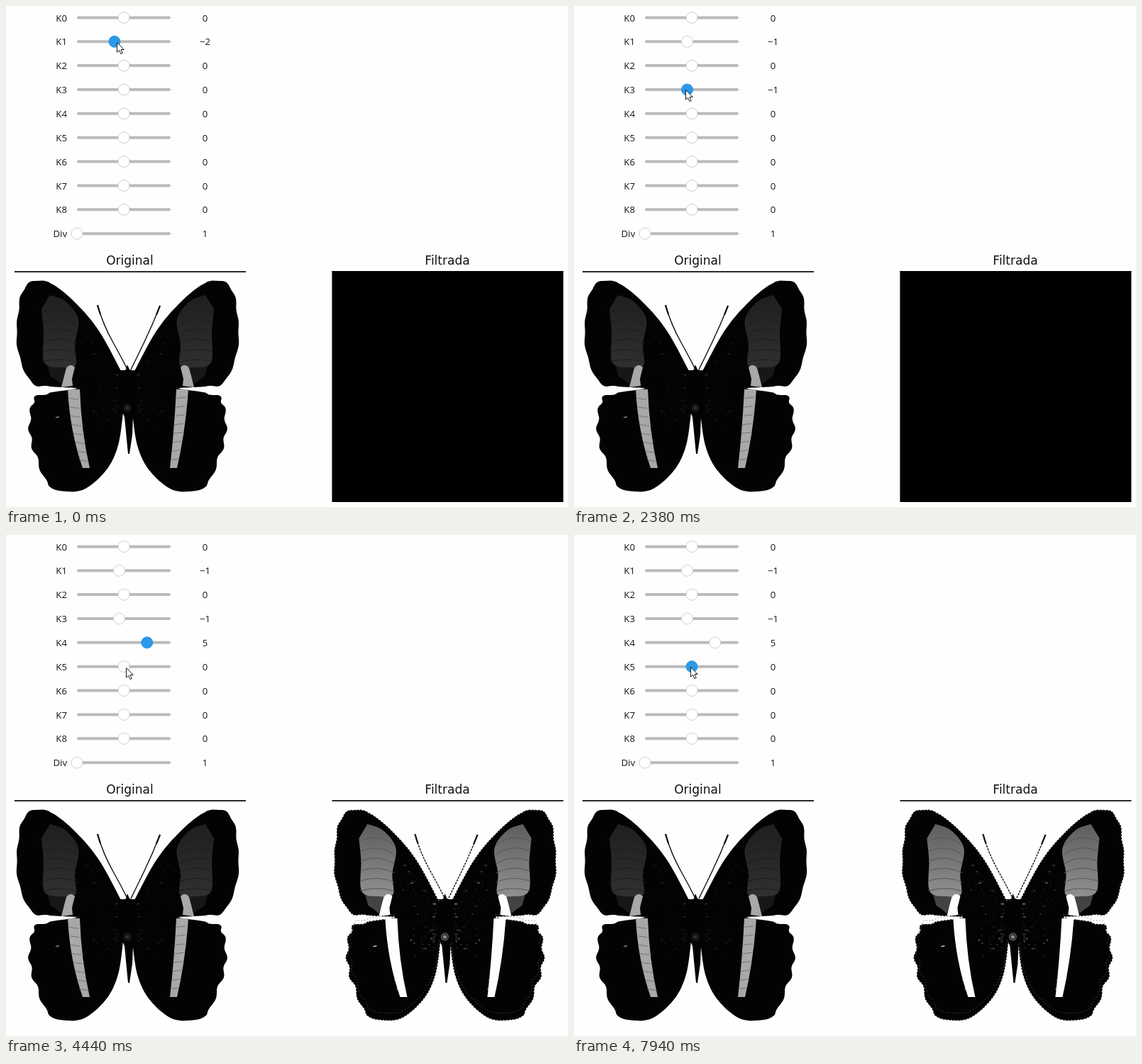
An HTML page that plays this animation: 792x707 px, repeating every 8000 ms.

```html
<!DOCTYPE html>
<html lang="es">
<head>
<meta charset="utf-8">
<title>Filtro de convolución</title>
<style>
  html, body { margin: 0; width: 100%; height: 100%; overflow: hidden; background: #fefefe; }
  svg { display: block; }
  .ui { font: 13.2px "Open Sans", "Noto Sans", sans-serif; fill: #161616; }
  .title { font: 17px "DejaVu Sans", sans-serif; fill: #111; text-anchor: middle; }
  .black { fill: #030303; }
  .patch { fill: var(--patch); }
  .bar { fill: var(--bar); }
  .speck { fill: var(--speck); }
  .vein { stroke: var(--vein); fill: none; }
  .barVein { stroke: var(--barVein); fill: none; }
</style>
</head>
<body>
<svg id="stage" width="792" height="707" viewBox="0 0 792 707"></svg>
<script>
const stage = document.getElementById('stage');
const LOOP = 8000;
const MIRROR = 343;
const rowY = row => 16.4 + row * 33.86;
const knobX = value => 166 + value * 6.55;
const clamp = (x, low, high) => Math.min(high, Math.max(low, x));
const count = n => [...Array(n).keys()];

function randomizer(seed) {
  return () => (seed = (seed * 16807) % 2147483647) / 2147483647;
}

// Samples a Catmull-Rom curve with outward normals; scallops ripple where x < 60.
function trace(text, scallop = 0) {
  const points = text.split(' ').map(pair => pair.split(',').map(Number));
  const at = i => points[clamp(i, 0, points.length - 1)];
  const steps = 10;
  return count((points.length - 1) * steps + 1).map(n => {
    const i = Math.floor(n / steps);
    const u = n / steps - i;
    const [a, b, c, d] = [at(i - 1), at(i), at(i + 1), at(i + 2)];
    const pos = k => b[k] + u * ((c[k] - a[k]) + u * ((2 * a[k] - 5 * b[k] + 4 * c[k] - d[k])
      + u * (3 * b[k] - a[k] - 3 * c[k] + d[k]))) / 2;
    const slope = k => (c[k] - a[k] + u * (2 * (2 * a[k] - 5 * b[k] + 4 * c[k] - d[k])
      + u * 3 * (3 * b[k] - a[k] - 3 * c[k] + d[k]))) / 2;
    const length = Math.hypot(slope(0), slope(1)) || 1;
    const nx = -slope(1) / length;
    const ny = slope(0) / length;
    const ripple = pos(0) < 60 ? scallop * Math.sin(u * 2 * Math.PI) : 0;
    return { x: pos(0) + nx * ripple, y: pos(1) + ny * ripple, nx, ny };
  });
}

const toPath = samples => 'M' + samples.map(p => `${p.x.toFixed(1)} ${p.y.toFixed(1)}`).join('L');

// Left wings, traced counterclockwise; the right side is mirrored.
const forewing = trace('163,517 132,460 100,421 66,393 38,388 22,406 17,436 15,470 22,505 38,533 62,537 100,539', 0.8)
  .map(p => ({ ...p, nx: -p.nx, ny: -p.ny }));
const hindwing = trace('100,540 48,549 37,563 33,590 36,617 46,645 60,677 84,685 112,681 142,654 158,620 165,574', 2)
  .map(p => ({ ...p, nx: -p.nx, ny: -p.ny }));
const forewingPath = toPath(forewing);
const hindwingPath = toPath(hindwing);
const patchPath = toPath(trace('62,408 84,417 102,442 97,478 98,507 80,510 54,503 53,460 50,428'));
const antennaLeft = 'M129 422Q136 448 151 475T171 513';
const antennaRight = 'M217 423Q207 449 194 476T176 513';

function specks() {
  const random = randomizer(71);
  const dots = count(90).map(() => {
    const x = 112 + random() * 48;
    const lead = 529 - (163 - x) * 1.5;
    const y = lead + random() * (595 - lead);
    const size = 0.7 + random() ** 3 * 2.4;
    return `<ellipse cx="${x}" cy="${y}" rx="${size}" ry="${size * 0.6}" opacity="${random()}"/>`;
  });
  return `<g class="speck">${dots.join('')}</g>`;
}

function lowerBar(top, middle, bottom) {
  const veins = count(8).map(i => {
    const u = (i + 1) / 9;
    const x = (1 - u) ** 2 * top + 2 * u * (1 - u) * middle + u * u * bottom;
    return `M${x - 7} ${541 + u * 112}l13 ${(bottom - top) / 9}`;
  });
  return `<path class="bar" d="M${top - 8.5} 541h17Q${middle + 8} 600 ${bottom + 5} 652h-10Q${middle - 8} 600 ${top - 8.5} 541Z"/>
    <path class="barVein" opacity=".7" d="${veins.join('')}"/>`;
}

function butterfly(sharp) {
  const veins = count(6).map(i => `M52 ${432 + i * 14}Q78 ${420 + i * 15} 100 ${438 + i * 13}`).join('');
  const jagged = `<g fill="none" stroke-dasharray="1.5 3">
    <path stroke="#fefefe" stroke-width="1.6" d="${forewingPath}${hindwingPath}"/>
    <path stroke="#666" stroke-width=".8" transform="translate(5 17) scale(.96)" d="${hindwingPath}"/>
  </g>`;
  const side = `
    <path class="black" d="${forewingPath}${hindwingPath}M162 514L98 540 166 575 173 560V514Z"/>
    <path class="patch" opacity=".45" d="M58 505L90 507 78 534 72 529 63 523Z"/>
    <path class="patch" d="${patchPath}"/><path fill="url(#shade)" d="${patchPath}"/>
    <path class="vein" d="${veins}"/>
    <path class="bar" d="M85 511Q91 503 97 510L93 526 94 536 78 538 82 522Z"/>
    ${specks()}${sharp ? jagged : ''}`;
  return `
    ${side}<g transform="translate(${MIRROR} 0) scale(-1 1)">${side}</g>
    ${lowerBar(95.5, 98, 113)}${lowerBar(248.5, 245, 236)}
    <path class="black" d="M161 517L169 513 171 506 174 513 184 516V562L179 580 178 605 174 632H172L167 580 159 562Z"/>
    <circle class="vein" cx="171" cy="567" r="4.5" stroke-width="2"/>
    <circle class="patch" cx="171" cy="567" r="2.6"/>
    <path class="bar" opacity=".8" d="M70 580l5-1v1.5l-5 1z"/>
    <g fill="none" stroke="#111">
      <path stroke-width="1.4" ${sharp ? 'stroke-dasharray="3 1.3"' : ''} d="${antennaLeft}${antennaRight}"/>
      <path stroke-width="2.2" stroke-dasharray="14 999" d="${antennaLeft}"/>
      <path stroke-width="2.2" stroke-dasharray="14 999" d="${antennaRight}"/>
    </g>`;
}

// Only edges facing right and down respond to the difference filter.
function edgeMap() {
  const random = randomizer(19);
  const wings = [...forewing, ...hindwing];
  const mirrored = wings.map(p => ({ ...p, x: MIRROR - p.x, nx: -p.nx }));
  const ticks = [...wings, ...mirrored].map(({ x, y, nx, ny }) => {
    const glow = Math.max(0.25, nx + ny) ** 2 * 0.6 * random();
    const reach = 1 + random() * 2.5;
    return `<path opacity="${glow.toFixed(2)}" d="M${x - ny * reach} ${y + nx * reach}L${x + ny * reach} ${y - nx * reach}"/>`;
  });
  return `<rect x="12" y="374" width="326" height="326"/>
    <g fill="none" stroke="#fff" stroke-width="1.2">${ticks.join('')}
      <path stroke-dasharray="7 4 2 5 1 6" opacity=".6" d="${antennaRight}"/>
      <path stroke-dasharray="5 3 8 4" opacity=".7" d="M180 583Q177 605 176 630"/>
      <path stroke-dasharray="2 6 3 4" opacity=".4" d="M240 545Q233 600 231 650M82 518L78 534M246 488L249 512"/>
    </g>`;
}

const title = (x, text) => `<text class="title" x="${x}" y="365">${text}</text>
  <path d="M${x - 162.5} 375h326" stroke="#2a2a2a" stroke-width="1.8"/>`;

const slider = row => `<g class="ui">
  <text x="86" y="${rowY(row) + 5.2}" text-anchor="end">${row < 9 ? 'K' + row : 'Div'}</text>
  <rect x="100" y="${rowY(row) - 2}" width="132" height="4" rx="2" fill="#bababa"/>
  <circle class="knob" cy="${rowY(row)}" r="8"/>
  <text class="value" x="280.5" y="${rowY(row) + 5.2}" text-anchor="middle"></text>
</g>`;

stage.innerHTML = `
  <linearGradient id="shade" x2="0" y2="1">
    <stop stop-opacity=".35"/><stop offset="1" stop-opacity="0"/>
  </linearGradient>
  <rect width="792" height="707" fill="#fefefe"/>
  ${count(10).map(slider).join('')}
  ${title(174.5, 'Original')}${title(622, 'Filtrada')}
  <g id="plain">${butterfly(false)}</g>
  <g transform="translate(447.4 0)">
    <rect id="blank" x="12" y="374" width="326" height="326"/>
    <g id="edges">${edgeMap()}</g>
    <g id="filtered">${butterfly(true)}</g>
  </g>
  <g id="cleared">
    <rect y="340" width="792" height="367" fill="#fefefe"/>
    <rect x="1" y="361.5" width="791" height="14.5" fill="#1e1e1e"/>
    <path d="M6 369l4-3.5v7z" fill="#454545"/>
    <rect y="378" width="792" height="329" fill="#1e1e1e"/>
  </g>
  <path id="cursor" d="M.5 .5V14.2L3.6 11.4 5.8 16.6 8.2 15.6 6 10.5H10.2Z" fill="#fff" stroke="#1a1a1a"/>`;

const knobs = [...stage.querySelectorAll('.knob')];
const values = [...stage.querySelectorAll('.value')];
const [plain, blank, edges, filtered, cleared, cursor] =
  ['plain', 'blank', 'edges', 'filtered', 'cleared', 'cursor'].map(id => document.getElementById(id));

const drags = [
  { row: 1, start: 200, end: 640, from: -2, to: -1 },
  { row: 3, start: 1860, end: 2030, from: 0, to: -1 },
  { row: 4, start: 2750, end: 3750, from: 0, to: 5 }
];
// The pointer rests on a knob from arrive to leave; the knob stays lit until blur.
const visits = [
  { row: 1, arrive: -100, leave: 880, blur: 1820, grip: 3 },
  { row: 3, arrive: 1500, leave: 2380, blur: 2760, grip: -2 },
  { row: 4, arrive: 2680, leave: 4260, blur: 6000, grip: 0 },
  { row: 5, arrive: 4435, leave: 4960, blur: 5060, grip: 3 },
  { row: 6, arrive: 5400, leave: 7430, blur: 7620, grip: 3 },
  { row: 5, arrive: 7890, leave: LOOP, blur: LOOP, grip: -2.5 }
];
const HOVER_DELAY = 40;
const CLEAR_STARTS = [2050, 4311];
const CLEAR_TIME = 80;
const FILTER_START = 2875;
const FILTER_TIME = 375;

function position(row, t) {
  const drag = drags.find(d => d.row === row);
  if (!drag) return row === 9 ? 1 : 0;
  return drag.from + (drag.to - drag.from) * clamp((t - drag.start) / (drag.end - drag.start), 0, 1);
}

function cursorAt(t) {
  const next = visits.findIndex(visit => visit.leave > t);
  const [prior, visit] = [visits[Math.max(0, next - 1)], visits[next]];
  const u = clamp((t - prior.leave) / (visit.arrive - prior.leave), 0, 1);
  const eased = next ? u * u * (3 - 2 * u) : 1;
  const x = v => knobX(position(v.row, t)) + v.grip;
  const y = v => rowY(v.row) + Math.max(0, v.grip) / 3;
  const mix = f => Math.round(f(prior) + (f(visit) - f(prior)) * eased);
  return `${mix(x)} ${mix(y)}`;
}

function tint(group, gain) {
  const tones = { patch: 48, bar: 168, vein: 29, barVein: 95, speck: 30 };
  for (const name in tones) {
    group.style.setProperty(`--${name}`, `rgb(${Array(3).fill(Math.min(254, tones[name] * gain))})`);
  }
}

const show = (part, visible) => part.setAttribute('display', visible ? 'inline' : 'none');

function render(t) {
  knobs.forEach((knob, row) => {
    const value = Math.round(position(row, t));
    const lit = visits.some(v => v.row === row && t >= v.arrive + HOVER_DELAY && t < v.blur);
    knob.setAttribute('cx', row === 9 ? 100 : knobX(value));
    knob.setAttribute('fill', lit ? '#2b98ea' : '#fff');
    knob.setAttribute('stroke', lit ? '#2b98ea' : '#cfcfcf');
    values[row].textContent = String(value).replace('-', '−');
  });

  // Filter results trail the slider, one kernel weight at a time.
  const gain = clamp(Math.floor((t - FILTER_START) / FILTER_TIME) + 1, 0, 5) - 2;
  show(blank, gain < 0);
  show(edges, gain === 0);
  show(filtered, gain > 0);
  tint(filtered, gain);
  show(cleared, CLEAR_STARTS.some(start => t >= start && t < start + CLEAR_TIME));
  cursor.setAttribute('transform', `translate(${cursorAt(t)})`);
}

tint(plain, 1);
const start = performance.now();
function tick() {
  render((performance.now() - start) % LOOP);
  requestAnimationFrame(tick);
}
tick();
</script>
</body>
</html>
```
